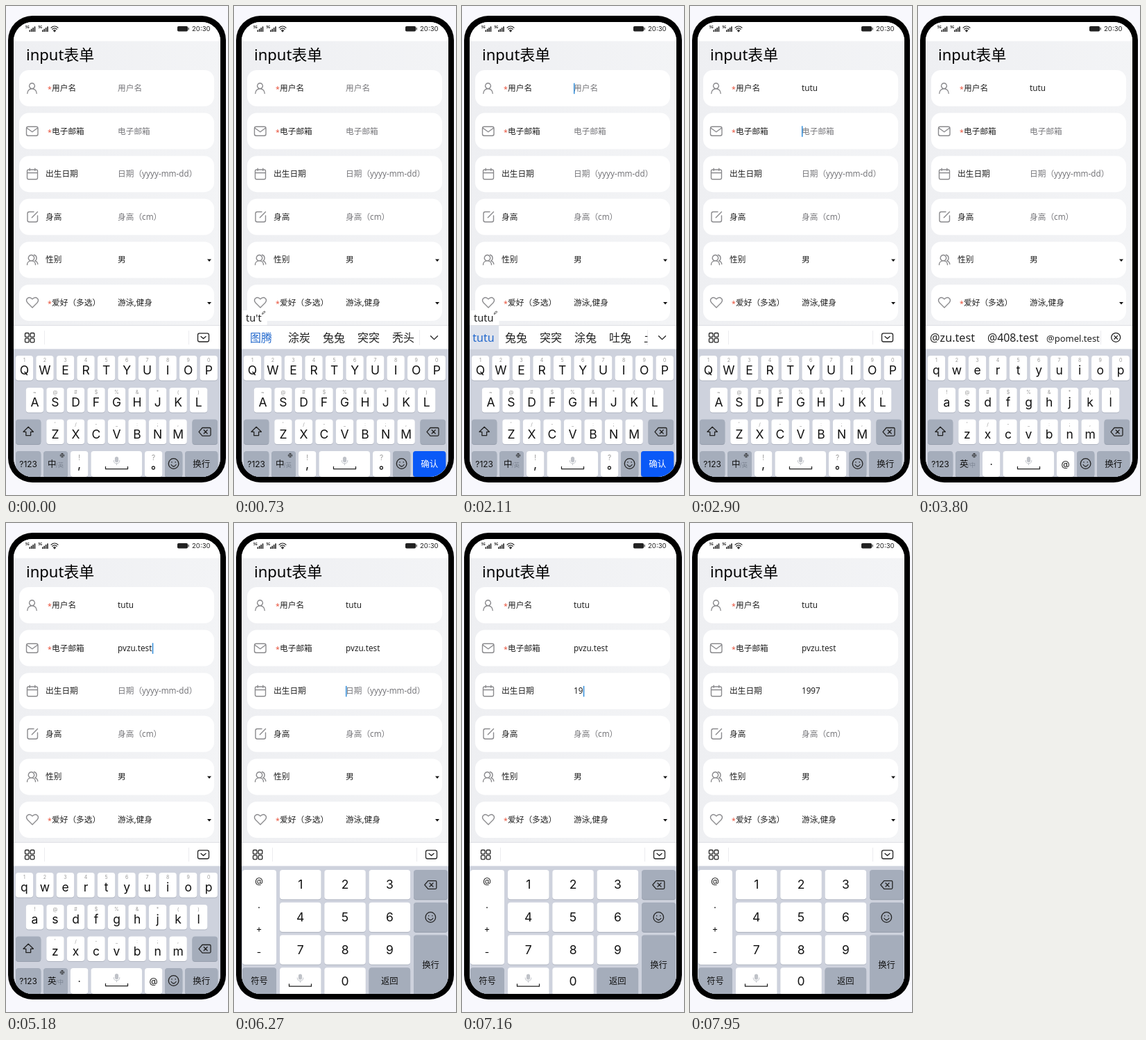
Write an HTML page that moves like this. It is 320x702 px and loops after 8000 ms.

```html
<!DOCTYPE html>
<html lang="zh-CN">
<head>
<meta charset="utf-8">
<title>input表单</title>
<style>
  html, body { margin: 0; width: 100%; height: 100%; overflow: hidden; background: #f8f8fd; }
  svg { display: block; width: 100vw; height: 100vh; }
  text { font-family: "Noto Sans", "Noto Sans CJK SC", sans-serif; fill: #222; white-space: pre; }
  .key text { font-family: Inter, "Noto Sans CJK SC", sans-serif; fill: #111; }
  .key .hint { fill: #999; }
  .line { fill: none; stroke: #222; stroke-width: 1.3; stroke-linecap: round; stroke-linejoin: round; }
  .icon { fill: none; stroke: #8b8b8e; stroke-width: 1.4; stroke-linecap: round; stroke-linejoin: round; }
</style>
</head>
<body>
<svg id="stage" viewBox="0 0 320 702">
  <defs>
    <clipPath id="screen"><rect x="11" y="23" width="298" height="653" rx="27"/></clipPath>
    <clipPath id="strip"><rect x="11" y="459" width="257" height="34"/></clipPath>
    <linearGradient id="page" x1="0" y1="0" x2="1" y2="0">
      <stop offset="0" stop-color="#eeeff2"/><stop offset="1" stop-color="#f3f4f6"/>
    </linearGradient>
  </defs>
</svg>
<script>
const NS = 'http://www.w3.org/2000/svg';
const LOOP = 8000;
const DARK = '#a5adbb', BLUE = '#0a59f7';

function el(parent, tag, attrs = {}) {
  const node = document.createElementNS(NS, tag);
  for (const k in attrs) node.setAttribute(k, attrs[k]);
  return parent.appendChild(node);
}
const group = (p, attrs) => el(p, 'g', attrs);
const rect = (p, x, y, width, height, fill, rx = 0) => el(p, 'rect', { x, y, width, height, fill, rx });
const path = (p, d, cls = 'line', more = {}) => el(p, 'path', { d, class: cls, ...more });
const circle = (p, cx, cy, r, cls = 'line') => el(p, 'circle', { cx, cy, r, class: cls });
function text(p, str, x, y, size, style = '') {
  const node = el(p, 'text', { x, y, 'font-size': size, style });
  node.textContent = str;
  return node;
}
const MID = 'text-anchor:middle;';
const show = (node, on) => { node.style.display = on ? '' : 'none'; };

const stage = document.getElementById('stage');
rect(stage, 3, 14, 314, 670, '#000', 35);
const screen = group(stage, { 'clip-path': 'url(#screen)' });
rect(screen, 11, 23, 298, 653, 'url(#page)');
rect(screen, 11, 23, 298, 27.5, '#fff');

// Status bar
function signal(x) {
  text(screen, '5G', x, 31.5, 4.5, 'font-weight:700');
  for (let i = 0; i < 4; i++) rect(screen, x + 5.5 + i * 2.4, 34.5 - i * 1.7, 1.6, 2.5 + i * 1.7, '#222');
}
signal(28);
signal(46.5);
path(screen, 'M65 31.2Q70 26.8 75 31.2M66.8 33.3Q70 30.5 73.2 33.3M68.5 35.2Q70 34 71.5 35.2L70 36.8Z', 'line', { style: 'stroke-width:1.2' });
rect(screen, 247, 29, 15, 7.5, '#222', 1.8);
rect(screen, 262.6, 31, 1.1, 3.5, '#222');
text(screen, '20:30', 268, 36.2, 9.6, 'font-family:Inter,sans-serif');

text(screen, 'input表单', 29, 77.5, 22, 'font-weight:500;fill:#000');

// Form
const ICONS = [
  'M37.5 110.8a3.9 3.9 0 1 0 .01 0M30.8 125.5C30.8 116.5 44.2 116.5 44.2 125.5',
  'M32 173.2H43.5Q46 173.2 46 175.7V183.8Q46 186.3 43.5 186.3H32Q29.5 186.3 29.5 183.8V175.7Q29.5 173.2 32 173.2ZM30.5 175.5L37.8 180.8L45 175.5',
  'M32.5 235H43.5Q45.5 235 45.5 237V246.5Q45.5 248.8 43.5 248.8H32.5Q30.5 248.8 30.5 246.5V237Q30.5 235 32.5 235ZM30.5 239.5H45.5M34.2 233.2V236.3M41.8 233.2V236.3',
  'M40 295.5H33.5Q31 295.5 31 298V307.5Q31 310 33.5 310H43Q45.5 310 45.5 307.5V301M37.3 303.7L45.5 295.5',
  'M36.5 357.5a4.2 4.2 0 1 0 .01 0M30.5 371.5C30.5 363.8 42.5 363.8 42.5 371.5M40.5 357.3C45 358.5 45 364 41.8 365.8Q45.5 367 45.8 370.5',
  'M38 433L31 426C27 421 33 415.5 38 420.8C43 415.5 49 421 45 426Z'
];
const FIELDS = [
  ['用户名', 1, '用户名'], ['电子邮箱', 1, '电子邮箱'], ['出生日期', 0, '日期（yyyy-mm-dd）'],
  ['身高', 0, '身高（cm）'], ['性别', 0, '', '男'], ['爱好（多选）', 1, '', '游泳,健身']
];
const inputs = FIELDS.map(([label, required, hint, value], i) => {
  const top = 92 + i * 61.6, base = top + 30;
  rect(screen, 19, top, 281, 52, '#fff', 14);
  path(screen, ICONS[i], 'icon');
  if (required) text(screen, '*', 60, base + 1.2, 10.5, 'fill:#e8503a');
  text(screen, label, required ? 66 : 57, base, 11.7);
  if (value) path(screen, `M290 ${top + 25}h6l-3 3.5z`, '', { fill: '#111' });
  return { top, hint, value, node: text(screen, value || hint, 161, base, 11.7) };
});
const caret = rect(screen, 161, 0, 1.4, 15.5, '#2787d8');

// Composition bubble
const bubble = group(screen);
const bubbleBox = rect(bubble, 11, 437, 30, 23, '#fff');
const bubbleText = text(bubble, '', 17, 453, 14.5);
const pencil = path(bubble, 'M0 4.5L.6 2.8L3 .4L4.3 1.7L1.8 4.1Z', 'line', { style: 'stroke-width:.8' });

// Strip above the keyboard
rect(screen, 11, 458.5, 298, 34, '#fff');
rect(screen, 11, 458.3, 298, .7, '#d4d6dc');
const tools = group(screen), words = group(screen), mails = group(screen);
for (const x of [27.5, 35.2]) for (const y of [469.5, 477.2])
  el(tools, 'rect', { x, y, width: 5.6, height: 5.6, rx: 1.2, class: 'line' });
el(tools, 'rect', { x: 276.5, y: 469.8, width: 16, height: 12.2, rx: 2.5, class: 'line' });
path(tools, 'M281 474.5L284.5 477.6L288 474.5');
rect(tools, 55, 466, .8, 20, '#e8e8ec');
rect(tools, 263, 466, .8, 20, '#e8e8ec');

const tapped = rect(words, 11, 459, 42, 33.5, '#dfe3ec');
const wordRow = group(words, { 'clip-path': 'url(#strip)' });
const wordNodes = Array.from({ length: 6 }, () => text(wordRow, '', 0, 481.5, 16, MID + 'font-weight:500'));
wordNodes[0].style.fill = '#2067cc';
rect(words, 267, 465, .7, 22, '#e4e4e8');
path(words, 'M283.5 473.8L288.5 478.6L293.5 473.8');

const mailTapped = rect(mails, 11, 459, 80, 33.5, '#dfe3ec');
text(mails, '@zu.test', 17, 481.5, 16.2);
text(mails, '@408.test', 100, 481.5, 15.8);
text(mails, '@pomel.test', 185, 481.5, 13);
rect(mails, 263, 466, .8, 20, '#e8e8ec');
circle(mails, 285.2, 475.8, 6.5);
path(mails, 'M282.8 473.4l4.8 4.8m0-4.8l-4.8 4.8');

// Keyboards
rect(screen, 11, 492.5, 298, 184, '#ced2dd');
const caps = {};
function key(p, name, x, y, w, h, label, size, dark, baseline) {
  const g = group(p, { class: 'key' });
  rect(g, x, y + 1, w, h, dark ? '#969eac' : '#b0b5c1', 4);
  const box = rect(g, x, y, w, h, dark ? DARK : '#fff', 4);
  if (label) text(g, label, x + w / 2, baseline || y + h / 2 + size * .36, size, MID);
  caps[name] = box;
  return g;
}
const hint = (g, str, x, y, size = 7) => text(g, str, x, y, size, MID).classList.add('hint');
const erase = (g, x, y) => path(g, `M${x - 8.5} ${y}l5-5.8h10.5q1.5 0 1.5 1.5v8.6q0 1.5-1.5 1.5h-10.5zM${x - 1.3} ${y - 2.5}l5 5m0-5l-5 5`);
function smile(g, x, y) {
  circle(g, x, y, 7.3);
  path(g, `M${x - 3.5} ${y + 1.5}q3.5 5 7 0M${x - 2.6} ${y - 2.4}v.5M${x + 2.6} ${y - 2.4}v.5`);
}
function spaceMark(g, x, y) {
  rect(g, x - 2.6, y - 6.5, 5.2, 8, '#bfc2c8', 2.6);
  path(g, `M${x - 4.3} ${y - 1}q0 4.3 4.3 4.3t4.3-4.3M${x} ${y + 3.3}v2`, 'line', { style: 'stroke:#bfc2c8;stroke-width:1' });
  path(g, `M${x - 16} ${y + 8}v3.2h32v-3.2`);
}

const ROWS = [
  ['QWERTYUIOP', 13.8, 502, '1234567890'],
  ['ASDFGHJKL', 28.8, 548, '~@#$%&*()'],
  ['ZXCVBNM', 58.3, 593.5, "'/-_:;,"]
];
function letterBoard(latin) {
  const board = group(screen), id = latin ? 'low-' : 'up-';
  for (const [letters, x0, y, hints] of ROWS) {
    [...letters].forEach((c, i) => {
      const x = x0 + i * 29.53;
      const g = key(board, id + c, x, y, 25.3, 35.5, latin ? c.toLowerCase() : c, 17.5, false, y + 27.3);
      hint(g, latin && hints[i] === '~' ? '!' : hints[i], x + 12.6, y + 9.3);
    });
  }
  const shift = key(board, id + 'shift', 14, 593.5, 36.3, 35.5, '', 0, true);
  path(shift, 'M32.2 604.3l7.2 7h-3.8v5.4h-6.8v-5.4h-3.8z');
  erase(key(board, id + 'erase', 268.5, 593.5, 36.5, 35.5, '', 0, true), 286.5, 611.3);

  key(board, id + 'sym', 14, 639, 36.3, 37, '?123', 12, true, 661.5);
  const lang = key(board, id + 'lang', 54, 639, 35, 37, '', 0, true);
  text(lang, latin ? '英' : '中', 60, 661.8, 12.5, 'font-weight:500');
  text(lang, latin ? '/中' : '/英', 71.5, 662, 8.5, 'fill:#7b8391');
  path(lang, 'M81 642.3a2.8 2.8 0 1 0 .01 0M78.2 645.1h5.6M81 642.3q-2.5 2.8 0 5.6q2.5-2.8 0-5.6', 'line', { style: 'stroke-width:.6' });
  const left = key(board, id + 'left', 93, 639, 25.3, 37, '', 0, false);
  spaceMark(key(board, id + 'space', 122.5, 639, 73.5, 37, '', 0, false), 159.5, 653.5);
  const right = key(board, id + 'right', 200, 639, 25.3, 37, latin ? '@' : '', 12.5, false, 661.5);
  if (latin) {
    text(left, '.', 105.6, 658.5, 15, MID);
  } else {
    hint(left, '!', 105.6, 652, 10);
    text(left, ',', 105.6, 664, 18, MID);
    hint(right, '?', 212.6, 652, 10);
    circle(right, 212.4, 663, 2);
  }
  smile(key(board, id + 'smile', 229, 639, 25.3, 37, '', 0, true), 241.6, 657);
  key(board, id + 'enter', 258, 639, 47.3, 37, '换行', 12.5, true, 661.8);
  return board;
}
const upper = letterBoard(false), lower = letterBoard(true);
const confirm = key(upper, 'confirm', 258, 639, 47.3, 37, '确认', 12.5, false, 661.8);
caps.confirm.setAttribute('fill', BLUE);
confirm.querySelector('text').style.fill = '#fff';

const digits = group(screen);
const side = key(digits, 'side', 12, 498, 49, 136, '', 0, false);
[['@', 518, 12], ['.', 553, 14], ['+', 587, 13], ['-', 621, 14]]
  .forEach(([c, y, size]) => text(side, c, 36, y, size, MID));
for (let n = 1; n <= 9; n++) {
  const x = 66 + (n - 1) % 3 * 64.3, y = 498 + Math.floor((n - 1) / 3) * 46.7;
  key(digits, 'n' + n, x, y, 59.5, 42.3, n, 17.5, false);
}
key(digits, 'n-sym', 12, 638.3, 49, 40, '符号', 12.3, true, 662);
spaceMark(key(digits, 'n-space', 66, 638.3, 59.5, 40, '', 0, false), 95.5, 654);
key(digits, 'n0', 130.3, 638.3, 59.5, 40, '0', 17.5, false, 663.5);
key(digits, 'n-back', 194.6, 638.3, 59.5, 40, '返回', 12.3, true, 662);
erase(key(digits, 'n-erase', 259, 498, 49, 42.3, '', 0, true), 283.3, 519.5);
smile(key(digits, 'n-smile', 259, 544.7, 49, 42.3, '', 0, true), 283.3, 566);
key(digits, 'n-enter', 259, 591.4, 49, 87, '换行', 12.3, true, 638.5);

// Step tables: [time, value]
const TRACKS = {
  board: [[0, 'upper'], [3300, 'lower'], [6170, 'digits']],
  strip: [[0, 'tools'], [230, 'words'], [2410, 'tools'], [3300, 'mails'], [5180, 'tools']],
  typed: [[0, ''], [230, 't'], [430, 'tu'], [630, "tu't"], [1520, 'tutu'], [2410, '']],
  press: [[0, ''], [130, 'up-T'], [330, ''], [430, 'up-U'], [530, ''], [630, 'up-T'], [730, ''],
    [1420, 'up-U'], [1520, ''], [3890, 'low-P'], [3990, ''], [4390, 'low-V'], [4590, ''],
    [6860, 'n1'], [6960, ''], [7060, 'n9'], [7160, ''], [7360, 'n9'], [7460, ''], [7660, 'n7'], [7760, '']],
  tap: [[0, false], [2110, true], [2210, false], [4980, true], [5080, false]],
  name: [[0, ''], [2410, 'tutu']],
  mail: [[0, ''], [3990, 'pv'], [5080, 'pvzu.test']],
  date: [[0, ''], [6960, '1'], [7160, '19'], [7460, '199'], [7760, '1997']],
  focus: [[0, 0], [2810, 1], [6070, 2]],
  caret: [[0, false], [130, true], [630, false], [1420, true], [1810, false], [2010, true], [2410, false],
    [2900, true], [3300, false], [3990, true], [5380, false], [5780, true], [5970, false], [6170, true], [7950, false]]
};
const WORDS = {
  t: ['他', '她', '它', '天', '太', '听'],
  tu: ['图', '土', '吐', '兔', '突', '涂'],
  "tu't": ['图腾', '涂炭', '兔兔', '突突', '秃头', ''],
  tutu: ['tutu', '兔兔', '突突', '涂兔', '吐兔', '土土']
};
const at = (track, t) => track.reduce((v, [time, next]) => t >= time ? next : v, track[0][1]);

function draw(t) {
  const s = {};
  for (const k in TRACKS) s[k] = at(TRACKS[k], t);

  show(upper, s.board === 'upper');
  show(lower, s.board === 'lower');
  show(digits, s.board === 'digits');
  show(tools, s.strip === 'tools');
  show(words, s.strip === 'words');
  show(mails, s.strip === 'mails');
  show(tapped, s.tap);
  show(mailTapped, s.tap);
  show(confirm, s.typed);
  show(bubble, s.typed);

  if (s.typed) {
    bubbleText.textContent = s.typed;
    const w = bubbleText.getComputedTextLength();
    bubbleBox.setAttribute('width', w + 14);
    pencil.setAttribute('transform', `translate(${w + 18} 437.5)`);
    const first = s.typed === 'tutu' ? 31 : 39, second = s.typed === 'tutu' ? 78 : 94;
    wordNodes.forEach((node, i) => {
      node.textContent = WORDS[s.typed][i];
      node.setAttribute('x', i ? second + (i - 1) * 50 : first);
    });
  }

  [s.name, s.mail, s.date].forEach((value, i) => {
    const { node, hint } = inputs[i];
    node.textContent = value || hint;
    node.style.fill = value ? '#222' : '#77777b';
  });
  const field = inputs[s.focus];
  const value = [s.name, s.mail, s.date][s.focus];
  caret.setAttribute('x', value ? 161.5 + field.node.getComputedTextLength() : 161);
  caret.setAttribute('y', field.top + 18.7);
  show(caret, s.caret);

  for (const k in caps) caps[k].style.fill = k === s.press ? '#c3c8d2' : '';
}
inputs[3].node.style.fill = '#77777b';

const start = performance.now();
function tick() {
  draw((performance.now() - start) % LOOP);
  requestAnimationFrame(tick);
}
tick();
</script>
</body>
</html>
```
